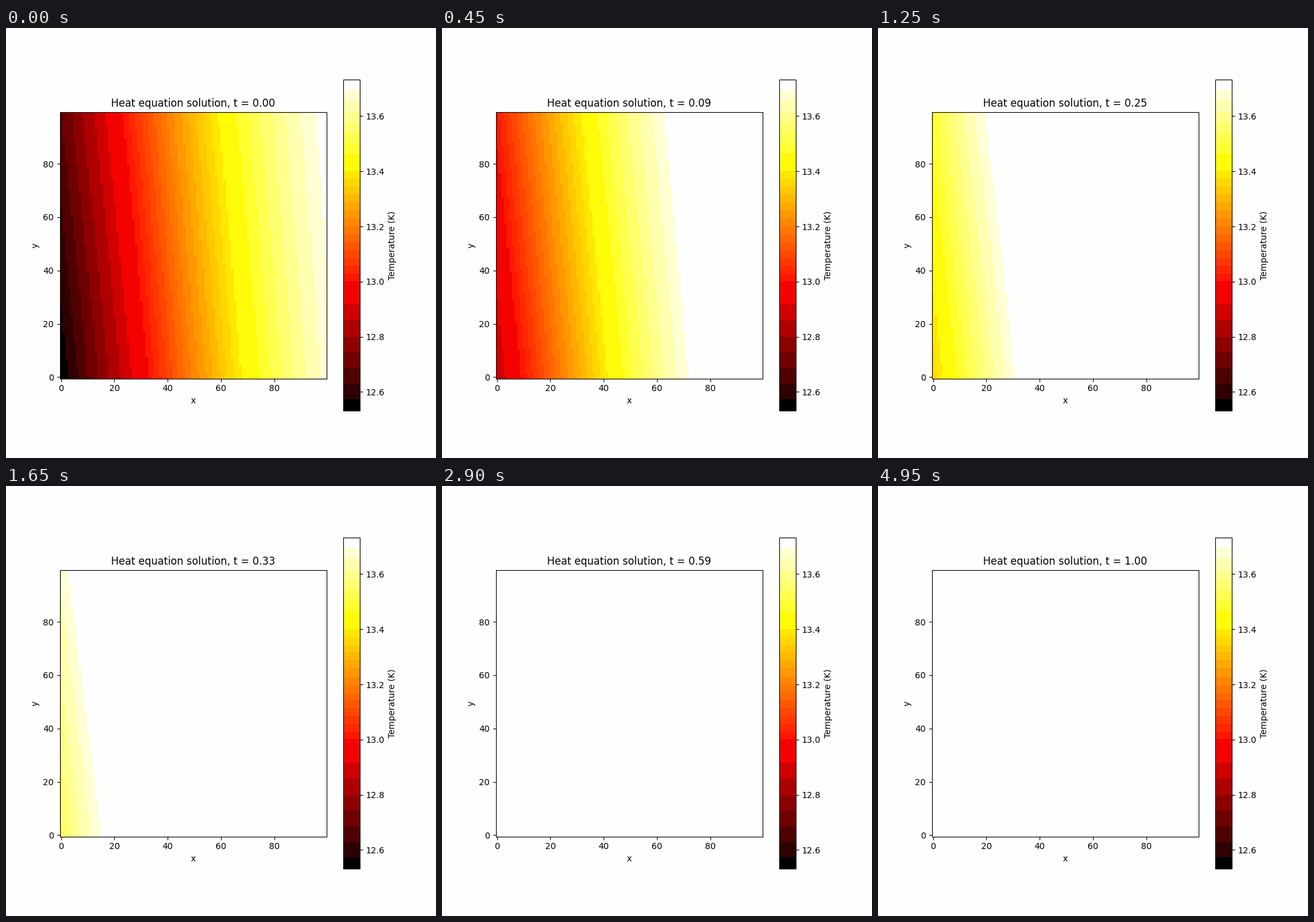
These frames come from a looping animation (700x700 px, 5 s). A matplotlib script:

```python
import numpy as np
import matplotlib.pyplot as plt
from matplotlib.animation import FuncAnimation
from matplotlib.colors import ListedColormap

N = 100
FRAMES = 100
T_MIN, T_MAX = 12.532, 13.7325
PAPER = "#fefefe"


def banded_hot():
    """The 'hot' map reduced to 3-4-3 bits per channel, each band averaged."""
    lut = (plt.get_cmap("hot")(np.arange(256))[:, :3] * 255).astype(int)
    keys = lut // [32, 16, 32]
    bands = np.empty((256, 3))
    for key in np.unique(keys, axis=0):
        band = (keys == key).all(axis=1)
        bands[band] = lut[band].mean(axis=0) // 1
    bands[(keys == keys[0]).all(axis=1)] = 0
    bands[(keys == keys[-1]).all(axis=1)] = 254
    return ListedColormap(bands / 255)


x, y = np.meshgrid((np.arange(N) + 0.5) / N, (np.arange(N) + 0.5) / N)


def temperature(t):
    t = min(t, 0.5)  # the whole plate is saturated well before this
    level = 0.058 + 1.27 * x - 0.355 * x**2
    level = level + 3.326 * t - 2.5 * t**2 - 1.09 * x * t
    level = level + (y - 0.5) * (0.13 - 0.09 * x - 0.05 * t)
    return T_MIN + (T_MAX - T_MIN) * np.clip(level, 0, 1)


fig, ax = plt.subplots(figsize=(7, 7), dpi=100, facecolor=PAPER)
image = ax.imshow(temperature(0), cmap=banded_hot(), origin="lower",
                  vmin=T_MIN, vmax=T_MAX)
fig.colorbar(image, ax=ax, label="Temperature (K)")
ax.set_xlabel("x")
ax.set_ylabel("y")
title = ax.set_title("Heat equation solution, t = 0.00")


def update(frame):
    t = frame / (FRAMES - 1)
    image.set_data(temperature(t))
    title.set_text(f"Heat equation solution, t = {t:.2f}")
    return image, title


anim = FuncAnimation(fig, update, frames=FRAMES, interval=50,
                     repeat=True, repeat_delay=0)
plt.show()
```
